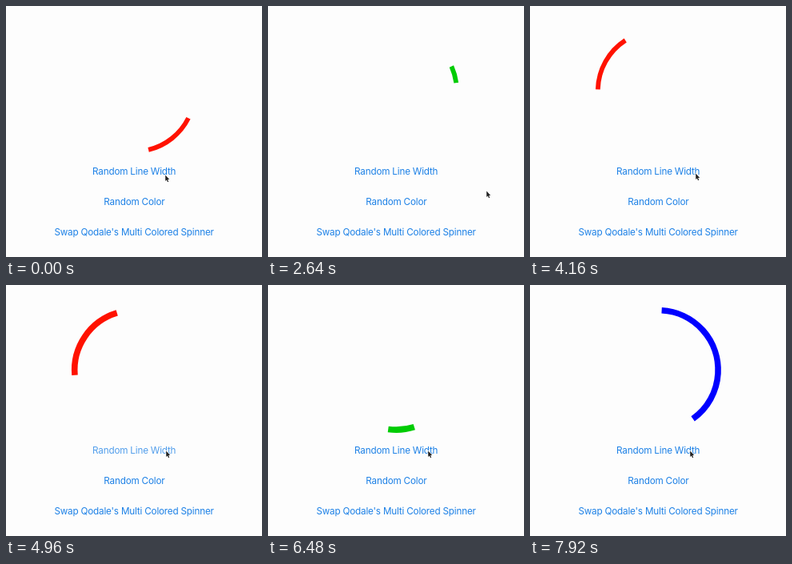
Write an HTML page with a canvas that moves like this. It is 320 px wide and 314 px high and loops after 8 s.

```html
<!DOCTYPE html>
<html lang="en">
<head>
<meta charset="utf-8">
<title>Spinner demo</title>
<style>
  html, body { margin: 0; width: 100%; height: 100%; overflow: hidden; background: #fdfdfd; }
  svg, canvas { position: absolute; left: 0; top: 0; width: 320px; height: 314px; }
  text { font: 400 11.7px Inter, "Liberation Sans", sans-serif; letter-spacing: -0.19px; fill: #1c80e6; text-anchor: middle; }
</style>
</head>
<body>
<svg viewBox="0 0 320 314">
  <text id="width" x="160.2" y="211.4">Random Line Width</text>
  <text x="160.4" y="248.9">Random Color</text>
  <text x="160.1" y="286.5">Swap Qodale's Multi Colored Spinner</text>
</svg>
<canvas id="stage"></canvas>
<script>
const LOOP = 8, CYCLE = 1.2, TURN = 3.2, CLICK = 4.7;
const CX = 160.4, CY = 106.4, OUTER = 78.5, TAU = Math.PI * 2;
const COLORS = ['#ff1200', '#ffe600', '#00cc04', '#0000ff'];
const ARROW = new Path2D('M0 0V7.4L1.7 6L2.8 8.7L4 8.2L2.9 5.6H5Z');

const canvas = document.getElementById('stage');
const ctx = canvas.getContext('2d');
const label = document.getElementById('width');
const dpr = window.devicePixelRatio || 1;
canvas.width = 320 * dpr;
canvas.height = 314 * dpr;

const clamp = v => Math.min(1, Math.max(0, v));

// cubic-bezier(.42, 0, .58, 1)
function ease(x) {
  let lo = 0, hi = 1, u = 0.5;
  for (let i = 0; i < 24; i++) {
    u = (lo + hi) / 2;
    const bx = 3 * u * (1 - u) ** 2 * 0.42 + 3 * u * u * (1 - u) * 0.58 + u ** 3;
    if (bx < x) lo = u; else hi = u;
  }
  return u * u * (3 - 2 * u);
}

// eased progress from 0 to 1 between two times
const glide = (t, from, to) => ease(clamp((t - from) / (to - from)));

function drawSpinner(t) {
  const time = t + 0.19 * (1 - clamp(t / 1.6));   // starts slightly ahead
  const cycles = (time - 3.91) / CYCLE;
  const index = Math.floor(cycles), phase = cycles - index;
  const grow = glide(phase, 0, 2 / 3), shrink = glide(phase, 2 / 3, 1);
  const head = 0.25 * grow + 0.75 * shrink;
  const base = 55 / 360 + time / TURN;

  ctx.lineWidth = t < CLICK ? 5.8 : 7.6;
  ctx.beginPath();
  ctx.arc(CX, CY, OUTER - ctx.lineWidth / 2, (base + head) * TAU, (base + grow) * TAU);

  // each cycle fades in over the previous colour
  const fade = clamp(phase * CYCLE / 0.11);
  if (fade < 1) {
    ctx.strokeStyle = COLORS[(index + 7) % 4];
    ctx.stroke();
  }
  ctx.globalAlpha = fade;
  ctx.strokeStyle = COLORS[(index + 8) % 4];
  ctx.stroke();
  ctx.globalAlpha = 1;
}

function drawPointer(t) {
  const away = glide(t, 2, 2.5), back = glide(t, 2.95, 3.5), settle = glide(t, 4.2, 4.5);
  ctx.save();
  ctx.translate(199.2 + 74 * away - 66 * back - 7 * settle, 211.5 + 20 * away - 22 * back - 2 * settle);
  ctx.lineJoin = 'round';
  ctx.lineWidth = 1.2;
  ctx.strokeStyle = '#fff';
  ctx.fillStyle = '#222';
  ctx.stroke(ARROW);
  ctx.fill(ARROW);
  ctx.restore();
}

// dims while pressed, then fades back
function labelAlpha(t) {
  return t < CLICK - 0.12 ? 1 : 0.2 + 0.8 * glide(t, CLICK, CLICK + 0.42);
}

function draw(t) {
  ctx.setTransform(dpr, 0, 0, dpr, 0, 0);
  ctx.clearRect(0, 0, 320, 314);
  drawSpinner(t);
  drawPointer(t);
  label.style.opacity = labelAlpha(t);
}

const start = performance.now();
function tick() {
  draw((performance.now() - start) / 1000 % LOOP);
  requestAnimationFrame(tick);
}
tick();
</script>
</body>
</html>
```
